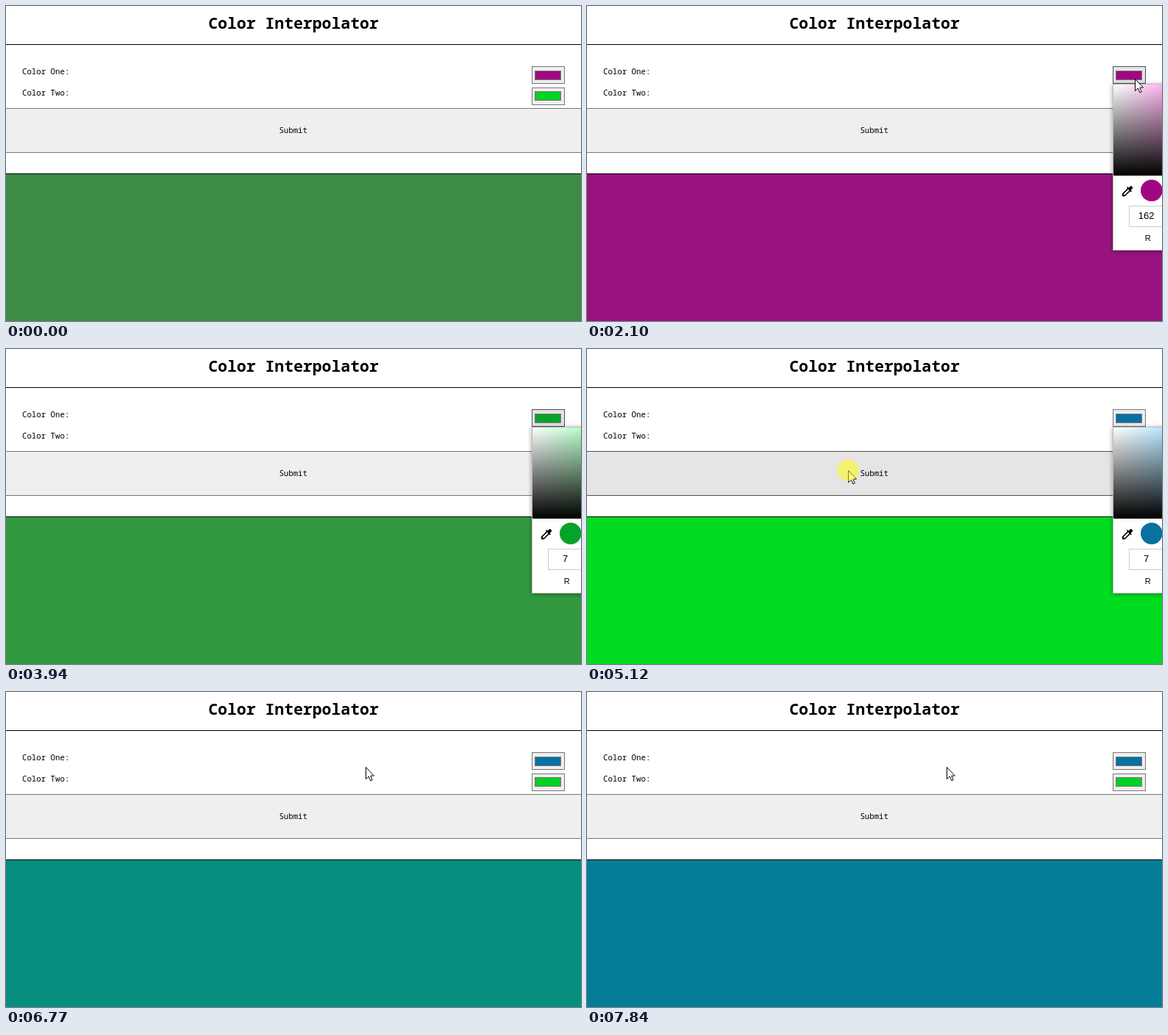
Write an HTML page that moves like this. It is 782 by 429 pixels and loops after 8000 ms.

```html
<!DOCTYPE html>
<html lang="en">
<head>
<meta charset="utf-8">
<title>Color Interpolator</title>
<style>
  html, body { margin: 0; width: 100%; height: 100%; overflow: hidden; background: #fff; }
  svg { display: block; width: 782px; height: 429px; }
  rect { shape-rendering: crispEdges; }
  .mono { font: 10.72px "Noto Sans Mono", "DejaVu Sans Mono", monospace; }
  .title { font-size: 21.44px; font-weight: 600; }
  .ui { font-family: "Liberation Sans", Arial, sans-serif; text-anchor: middle; }
</style>
</head>
<body>
<svg viewBox="0 0 782 429">
  <defs>
    <linearGradient id="tint" gradientUnits="userSpaceOnUse" x1="716" x2="948" y1="0" y2="0">
      <stop stop-color="#fff"/><stop id="hueStop" offset="1"/>
    </linearGradient>
    <linearGradient id="shade" x2="0" y2="1">
      <stop stop-opacity="0"/><stop offset="1"/>
    </linearGradient>
    <filter id="shadow" x="-10%" y="-10%" width="120%" height="120%">
      <feDropShadow dx="0" dy="1" stdDeviation="3" flood-opacity=".4"/>
    </filter>
  </defs>

  <rect width="782" height="429" fill="#fff"/>
  <text class="mono title" x="391" y="31" text-anchor="middle">Color Interpolator</text>
  <rect y="52" width="782" height="1"/>
  <text class="mono" x="22" y="93">Color One:</text>
  <text class="mono" x="22" y="122">Color Two:</text>

  <rect id="one" x="715.5" y="82.5" width="44" height="23"/>
  <rect id="oneFill" x="719.5" y="88.5" width="35" height="12" stroke="#777"/>
  <rect x="715.5" y="111.5" width="44" height="23" fill="#efefef" stroke="#767676"/>
  <rect x="719.5" y="116.5" width="35" height="12" fill="#05d125" stroke="#777"/>

  <rect id="edge" y="139" width="782" height="61"/>
  <rect id="face" y="140" width="782" height="59"/>
  <text class="mono" x="390.7" y="173" text-anchor="middle">Submit</text>
  <rect y="228" width="782" height="1"/>
  <rect id="result" y="229" width="782" height="200"/>

  <g id="picker">
    <rect x="715" y="106" width="240" height="227" fill="#bbb" filter="url(#shadow)"/>
    <rect x="716" y="107" width="238" height="225" fill="#fff"/>
    <rect x="716" y="107" width="66" height="124" fill="url(#tint)"/>
    <rect x="716" y="107" width="66" height="124" fill="url(#shade)"/>
    <path transform="translate(725.5 242.5) scale(.8)" d="M20.7 5.6l-2.3-2.3c-.4-.4-1-.4-1.4 0l-3.1 3.1-2-1.9-1.4 1.4 1.4 1.4L3 16.3V21h4.7l9-8.9 1.4 1.4 1.4-1.4-1.9-1.9 3.1-3.1c.4-.4.4-1 0-1.5zM6.9 19L5 17.1 13.1 9l1.9 1.9z"/>
    <circle id="dot" cx="767.8" cy="251.3" r="14.8"/>
    <rect x="737.5" y="272.5" width="46" height="28" fill="#fff" stroke="#ccc"/>
    <text id="red" class="ui" x="760.7" y="290" font-size="13"></text>
    <text class="ui" x="762.7" y="320" font-size="11">R</text>
  </g>

  <path id="cursor" d="M.5 .5V16.6L4.3 13 6.8 18.8 9.2 17.8 6.8 12.1H11.4Z" fill="#fff" stroke="#000"/>
  <circle id="halo" r="15" fill="#ff0" fill-opacity=".5"/>
</svg>
<script>
  const LOOP = 8000, TICK = 77;
  const PURPLE = [162, 7, 133], GREEN = [0, 220, 32];
  const LIME = [5, 209, 37], BLUE = [6, 117, 161];

  const el = id => document.getElementById(id);
  const set = (id, attrs) => {
    for (const k in attrs) el(id).setAttribute(k, attrs[k]);
  };
  const show = (id, on) => set(id, { visibility: on ? 'visible' : 'hidden' });
  const within = (t, a, b) => t >= a && t < b;
  const rgb = c => `rgb(${c.join()})`;
  const ease = f => f * f * (3 - 2 * f);
  const mix = (a, b, f) => a.map((v, i) => v + (b[i] - v) * f);
  const mixRgb = (a, b, f) => rgb(mix(a, b, f).map(Math.round));

  // Glides start at a time, take whole steps, and bow out by bend halfway.
  const cursorGlides = [
    { at: 380, steps: 11, to: [610, 147], bend: [0, 0] },
    { at: 1250, steps: 8, to: [745, 99], bend: [0, 0] },
    { at: 2240, steps: 8, to: [800, 267], bend: [-45, 0] },
    { at: 4960, steps: 3, to: [355, 165], bend: [0, -60] },
    { at: 6060, steps: 5, to: [489, 102], bend: [0, 0] },
    { at: 7770, steps: 2, to: [488, 101], bend: [0, 0] }
  ];
  const hueGlides = [
    { at: 3260, steps: 7, to: [136], bend: [0] },
    { at: 3940, steps: 4, to: [122], bend: [0] },
    { at: 4340, steps: 4, to: [199], bend: [0] }
  ];

  function follow(glides, from, t) {
    return glides.filter(g => g.at <= t).reduce((p, g) => {
      const done = Math.floor((t - g.at) / TICK) + 1;
      const f = ease(Math.min(1, done / g.steps));
      return mix(p, g.to, f).map((v, i) => v + g.bend[i] * Math.sin(Math.PI * f));
    }, from);
  }

  function hueColor(h, lo, hi) {
    return [5, 3, 1].map(n => {
      const k = (n + h / 60) % 6;
      return Math.round(hi - (hi - lo) * Math.max(0, Math.min(k, 4 - k, 1)));
    });
  }

  // The blend advances in equal jumps, first purple to green, then green to blue.
  function resultColor(t) {
    if (t < 220) return mixRgb(PURPLE, GREEN, .625);
    if (t < 5270) {
      const jumps = Math.max(0, Math.floor((t - 2100) / 920));
      return mixRgb(PURPLE, GREEN, .057 + .314 * jumps);
    }
    if (t < 6770) return mixRgb(LIME, BLUE, .35);
    return mixRgb(LIME, BLUE, .715 + .0975 * Math.floor((t - 6770) / 370));
  }

  function draw(t) {
    const [x, y] = follow(cursorGlides, [800, 372], t).map(Math.round);
    const [hue] = follow(hueGlides, [312], t);
    const picked = hueColor(hue, 7, 162);
    const open = within(t, 1950, 5270);

    set('result', { fill: resultColor(t) });

    const over = x < 782 && within(y, 139, 200) && !(open && x >= 715);
    const pressed = within(t, 5600, 5830);
    set('face', { fill: pressed ? '#f5f5f5' : over ? '#e5e5e5' : '#efefef' });
    set('edge', { fill: pressed ? '#8d8d8d' : over ? '#4f4f4f' : '#767676' });

    const overOne = within(x, 715, 760) && within(y, 82, 106) || open && t < 4960;
    set('one', { fill: overOne ? '#e5e5e5' : '#efefef', stroke: overOne ? '#4f4f4f' : '#767676' });
    set('oneFill', { fill: rgb(picked) });

    show('picker', open);
    set('hueStop', { 'stop-color': rgb(hueColor(hue, 0, 255)) });
    set('dot', { fill: rgb(picked) });
    el('red').textContent = picked[0];

    set('cursor', { transform: `translate(${x} ${y})` });
    set('halo', { cx: x, cy: y });
    show('halo', within(t, 1870, 2020) || within(t, 5120, 5270) || pressed);
  }

  const origin = performance.now();
  function frame() {
    draw((performance.now() - origin) % LOOP);
    requestAnimationFrame(frame);
  }
  frame();
</script>
</body>
</html>
```
